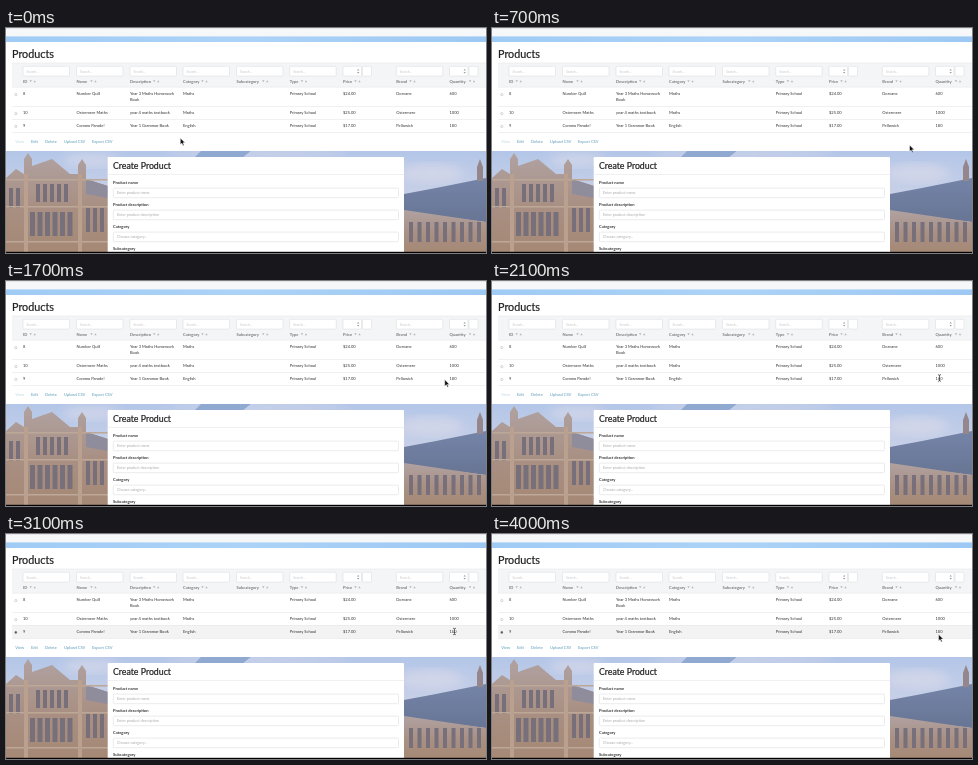
Animation, 480 px wide and 225 px high, one loop 4100 ms. Source, as an HTML page:

```html
<!DOCTYPE html>
<html lang="en">
<head>
<meta charset="utf-8">
<title>Products</title>
<style>
  html, body { margin: 0; width: 100%; height: 100%; overflow: hidden; background: #fff; }
  svg { display: block; width: 100vw; height: 100vh; }
  text { font: 4.05px Lato, "Open Sans", sans-serif; fill: #333; white-space: pre; }
  .title, .heading { fill: #222; stroke: #222; stroke-width: .22; }
  .title { font-size: 10.8px; }
  .heading { font-size: 8.75px; }
  .label { font-weight: 700; }
  .head { font-weight: 700; fill: #777; }
  .hint { font-size: 3.75px; fill: #aaa; }
  .search { font-size: 3.3px; fill: #c6c6c6; }
  .link { fill: #5a9aba; }
</style>
</head>
<body>
<svg id="stage" viewBox="0 0 480 225" preserveAspectRatio="none">
  <defs>
    <linearGradient id="sky" x2="0" y2="1">
      <stop offset="0" stop-color="#b3c6e8"/>
      <stop offset=".4" stop-color="#c6cfe7"/>
      <stop offset="1" stop-color="#d2d4e6"/>
    </linearGradient>
    <linearGradient id="strip">
      <stop offset="0" stop-color="#9fcbf5"/>
      <stop offset=".5" stop-color="#acd3f7"/>
      <stop offset="1" stop-color="#9cc8f3"/>
    </linearGradient>
    <linearGradient id="stone" x2="0" y2="1">
      <stop offset="0" stop-color="#b0a2a2"/>
      <stop offset=".5" stop-color="#a99084"/>
      <stop offset="1" stop-color="#a58874"/>
    </linearGradient>
    <linearGradient id="slate" x2="0" y2="1">
      <stop offset="0" stop-color="#7484a8"/>
      <stop offset="1" stop-color="#687594"/>
    </linearGradient>
    <filter id="soft"><feGaussianBlur stdDeviation=".6"/></filter>
    <filter id="cloud"><feGaussianBlur stdDeviation="5"/></filter>
  </defs>
  <rect y="122" width="480" height="103" fill="url(#sky)"/>
  <g id="photo" filter="url(#soft)"></g>
  <g id="page"></g>
  <g id="pointer">
    <path id="arrow" d="M0 0V6.6L1.6 5.2L2.7 7.7L3.8 7.2L2.7 4.8H4.8Z" fill="#111" stroke="#fff" stroke-width=".5"/>
    <g id="beam" fill="none">
      <path d="M-1.4-3.3Q0-3.3 0-2.3V2.3Q0 3.3-1.4 3.3M1.4-3.3Q0-3.3 0-2.3M0 2.3Q0 3.3 1.4 3.3M-1 .9H1" stroke="#fff" stroke-width="1.7"/>
      <path d="M-1.4-3.3Q0-3.3 0-2.3V2.3Q0 3.3-1.4 3.3M1.4-3.3Q0-3.3 0-2.3M0 2.3Q0 3.3 1.4 3.3M-1 .9H1" stroke="#333" stroke-width=".75"/>
    </g>
  </g>
</svg>
<script>
const LOOP = 4100;
const $ = id => document.getElementById(id);
const photo = $('photo'), page = $('page');

function add(parent, tag, attrs, content) {
  const el = document.createElementNS('http://www.w3.org/2000/svg', tag);
  for (const key in attrs) el.setAttribute(key, attrs[key]);
  if (content !== undefined) el.textContent = content;
  return parent.appendChild(el);
}
const box = (x, y, width, height, fill, parent = page) =>
  add(parent, 'rect', { x, y, width, height, fill });
const shape = (d, fill) => add(photo, 'path', { d, fill });
const text = (x, y, str, cls = '') => add(page, 'text', { x, y, class: cls }, str);
const rule = (x, y, width, color = '#e6e6e6') => box(x, y, width, .6, color);
const field = (x, y, width, height) => add(page, 'rect', {
  x, y, width, height, rx: 1, fill: '#fff', stroke: '#dcdee0', 'stroke-width': .6
});

function windows(x, y, count, step, w, h) {
  for (let i = 0; i < count; i++) box(x + i * step, y, w, h, '#77707b', photo);
}

function drawPhoto() {
  for (const [cx, cy, rx, ry] of [[85, 132, 28, 7], [250, 126, 90, 4], [425, 145, 32, 10]])
    add(photo, 'ellipse', { cx, cy, rx, ry, fill: '#dcdcea', opacity: .6, filter: 'url(#cloud)' });
  shape('M196 122H246L236 130H188Z', '#8fa9d0');

  // sandstone front
  shape('M0 150L10 141L18 146V131L22 125L26 131V138L46 131L64 146H72V137L76 131L80 137V151L102 158V227H0Z', 'url(#stone)');
  shape('M80 151L102 158V170L80 166Z', '#8f8c9c');
  windows(3, 160, 2, 7, 4, 20);
  windows(30, 156, 5, 7, 4, 18);
  windows(24, 184, 6, 7.5, 5, 24);
  windows(80, 180, 3, 7, 4, 24);
  for (const y of [151, 178, 213]) box(0, y, 102, 1.5, '#bda797', photo);
  for (const x of [18, 72]) box(x, 146, 4, 80, '#baa08f', photo);

  // slate roof and wall
  shape('M398 166L430 160L480 150V194L398 184Z', 'url(#slate)');
  shape('M471 153V139L474 131L477 139V153Z', '#94868b');
  shape('M398 182L480 194V227H398Z', 'url(#stone)');
  windows(403, 194, 9, 8.5, 4, 20);
}

const columns = [
  [17, 'ID', 24.7], [70.5, 'Name', 85.5], [124, 'Description', 148.2],
  [177, 'Category', 196.5], [230.5, 'Subcategory', 257.3], [283.7, 'Type', 296],
  [337, 'Price', 349.5], [390.3, 'Brand', 404.5], [443.5, 'Quantity', 464]
];
const rows = [
  [67.2, '8', 'Number Quill', 'Year 3 Maths Homework', 'Maths', '', 'Primary School', '$24.00', 'Dorvane', '600'],
  [86.2, '10', 'Ostermere Maths', 'year 4 maths textbook', 'Maths', '', 'Primary School', '$25.00', 'Ostermere', '1000'],
  [99, '9', 'Comma Parade!', 'Year 1 Grammar Book', 'English', '', 'Primary School', '$17.00', 'Pellowick', '180']
];

function drawTable() {
  box(0, 0, 480, 8.6, '#f6f7f8');
  rule(0, 0, 480, '#d5d9dc');
  box(0, 8.4, 480, 5.8, 'url(#strip)');
  box(0, 14, 480, 109, '#fff');
  text(6, 30.3, 'Products', 'title');
  box(6, 35, 474, 24, '#f3f5f6');
  rule(6, 34.7, 474);
  rule(6, 58.8, 474);
  for (const [x, name, sort] of columns) {
    if (name === 'Price' || name === 'Quantity') {
      field(x, 38.3, 18.5, 9.8);
      field(x + 19.5, 38.3, 9, 9.8);
      add(page, 'path', { d: `M${x + 14} 42.6l1.2-1.6 1.2 1.6zm0 1.4l1.2 1.6 1.2-1.6z`, fill: '#999' });
    } else {
      field(x, 38.3, 46.5, 9.8);
      text(x + 3.5, 44.5, 'Search...', 'search');
    }
    text(x, 54.9, name, 'head');
    add(page, 'path', {
      d: `M${sort - 1.2} 52.2h2.4l-1.2 2zm4 2l1.2-2 1.2 2z`, fill: '#b4b8bb'
    });
  }
  const hover = box(6, 91.3, 474, 12.8, '#ebebeb');
  for (const y of [78.1, 91, 104]) rule(6, y, 474);
  for (const [y, ...cells] of rows) {
    add(page, 'circle', { cx: 9.8, cy: y - .6, r: 1.15, fill: '#fff', stroke: '#aaa', 'stroke-width': .5 });
    cells.forEach((cell, i) => text(columns[i][0], y, cell));
  }
  text(124, 73.4, 'Book');
  const dot = add(page, 'circle', { cx: 9.8, cy: 98.4, r: 1.1, fill: '#555' });
  const view = text(9.3, 114.5, 'View', 'link');
  [[25, 'Edit'], [39, 'Delete'], [58, 'Upload CSV'], [86, 'Export CSV']]
    .forEach(([x, name]) => text(x, 114.5, name, 'link'));
  return { hover, dot, view };
}

function drawForm() {
  add(page, 'rect', { x: 101.7, y: 129, width: 296.3, height: 98, rx: 1, fill: '#fff' });
  text(107, 141.3, 'Create Product', 'heading');
  rule(101.7, 146.3, 296.3);
  [['Product name', 'Enter product name'],
   ['Product description', 'Enter product description'],
   ['Category', 'Choose category...']].forEach(([label, hint], i) => {
    const y = 156.4 + i * 22;
    text(107, y, label, 'label');
    field(107.3, y + 3.7, 285.2, 9.6);
    text(111, y + 9.8, hint, 'hint');
  });
  text(107, 222.2, 'Subcategory', 'label');
  box(0, 223.8, 480, 1.2, '#000');
}

drawPhoto();
const ui = drawTable();
drawForm();

// time, x, y of the pointer
const path = [
  [0, 174.3, 110], [600, 174.3, 110], [700, 417.5, 117], [800, 421, 119],
  [1000, 440, 104], [1200, 448, 89], [1300, 437.5, 105], [1800, 439, 97],
  [1900, 449.5, 89], [2000, 449.5, 89], [2100, 447.5, 97], [2200, 445.5, 97.3],
  [2900, 445.5, 97.3], [3100, 448.5, 97.5], [3500, 446.5, 100.3], [4100, 446.5, 100.3]
];

function pointerAt(t) {
  const i = path.findIndex(p => p[0] > t);
  const [t0, x0, y0] = path[i - 1], [t1, x1, y1] = path[i];
  const k = (t - t0) / (t1 - t0);
  return [x0 + (x1 - x0) * k, y0 + (y1 - y0) * k];
}

const show = (el, opacity) => { el.style.opacity = Number(opacity); };

function render(time) {
  const t = Math.floor(time % LOOP / 100) * 100;
  const [x, y] = pointerAt(t);
  const onText = t >= 2100 && t < 3400;
  const selected = t >= 2300;
  $('pointer').setAttribute('transform', `translate(${x} ${y})`);
  show($('arrow'), !onText);
  show($('beam'), onText);
  show(ui.hover, t >= 2200);
  ui.hover.setAttribute('fill', t < 2400 ? '#eaeaea' : '#f3f3f3');
  show(ui.dot, selected);
  show(ui.view, selected ? 1 : .4);
}

const start = performance.now();
function tick() {
  render(performance.now() - start);
  requestAnimationFrame(tick);
}
tick();
</script>
</body>
</html>
```
